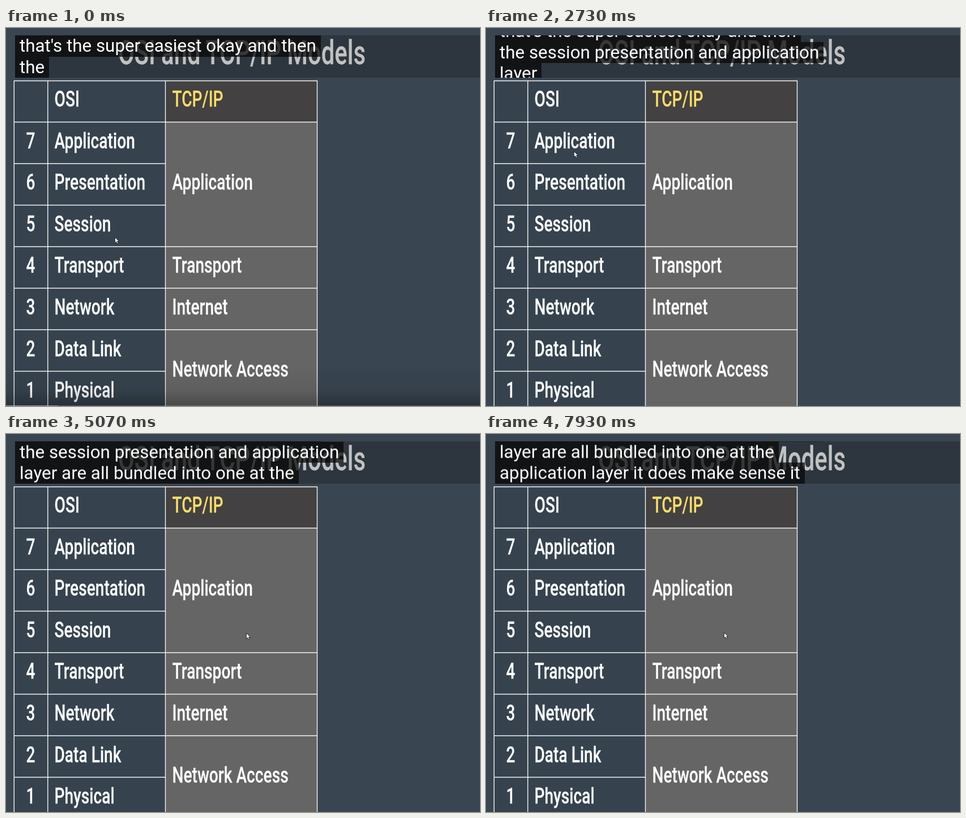
These frames come from a looping animation (837x669 px, 8000 ms). An HTML page:

```html
<!DOCTYPE html>
<html lang="en">
<head>
<meta charset="utf-8">
<title>Network layers</title>
<style>
  html, body { margin: 0; width: 100%; height: 100%; overflow: hidden; background: #394550; }
  #stage { position: relative; width: 837px; height: 669px; overflow: hidden; }
  #slide { position: absolute; left: 0; top: 0; }
  #slide text { font: 500 39.4px Roboto, sans-serif; fill: #fff; stroke: #fff; stroke-width: .25px; }
  #slide .title { font-size: 58.4px; }
  #slide .gold { fill: #fadc6c; stroke: #fadc6c; }
  .grid { fill: none; stroke: #f2f4f5; stroke-width: 1.4; }

  #cursor { position: absolute; left: 0; top: 0; overflow: visible; animation: wander 8s infinite linear; }
  @keyframes wander {
    0%, 6.63%       { transform: translate(192px, 370px); }
    13%             { transform: translate(188px, 354px); }
    18%             { transform: translate(182px, 300px); }
    23%, 25%        { transform: translate(175px, 275px); }
    31%, 36%        { transform: translate(155px, 218px); }
    42%             { transform: translate(300px, 288px); }
    48.2%, 49.2%    { transform: translate(553px, 345px); }
    50%             { transform: translate(516px, 349px); }
    54%, 64%        { transform: translate(424px, 352px); }
    71%, 100%       { transform: translate(420px, 351px); }
  }

  #controls {
    position: absolute; left: 0; right: 0; bottom: 0; height: 70px;
    background: linear-gradient(transparent, rgba(0,0,0,.06) 60%, rgba(0,0,0,.27));
    animation: hide 8s infinite linear;
  }
  #controls::after {
    content: ""; position: absolute; left: 0; right: 0; bottom: 0; height: 1px;
    background: linear-gradient(90deg, rgba(255,255,255,.55) 92px, rgba(255,255,255,.22) 92px);
  }
  @keyframes hide {
    0%, 6.63% { opacity: 1; }
    10%, 100% { opacity: 0; }
  }

  #captions {
    position: absolute; left: 16px; top: 13.4px; right: 0; height: 74.6px;
    overflow: hidden; background: rgba(8,8,8,.25);
  }
  #roll { animation: roll 8s infinite linear; }
  @keyframes roll {
    0%, 30.34%      { transform: translateY(0); }
    35.75%, 67.5%   { transform: translateY(-37.3px); }
    72.9%, 100%     { transform: translateY(-74.6px); }
  }
  .line { height: 37.3px; }
  .line span {
    display: inline-block; padding: 0 8px; background: rgba(8,8,8,.75); color: #fff;
    font: 31.35px/37.3px Roboto, sans-serif; white-space: pre;
  }
</style>
</head>
<body>
<div id="stage">
  <svg id="slide" width="837" height="669">
    <rect x="14" y="93.5" width="267.5" height="580" fill="#36434e"/>
    <rect x="281.5" y="93.5" width="268" height="73" fill="#434141"/>
    <rect x="281.5" y="166.5" width="268" height="510" fill="#656565"/>
    <path class="grid" d="M14.3 680V93.5H549.5V680M73.8 93.5V680M281.5 93.5V680
      M14 166.5H549.5M14 240H281.5M14 313.5H281.5M14 387H549.5M14 460.5H549.5M14 534H549.5M14 607.5H281.5"/>
  </svg>
  <svg id="cursor" width="10" height="14">
    <path d="M.4 .4V10.4L2.7 8.3L4.3 11.8L6 11L4.5 7.6H7.6Z" fill="#fff" stroke="#111" stroke-width=".8"/>
  </svg>
  <div id="controls"></div>
  <div id="captions"><div id="roll"></div></div>
</div>
<script>
  const LOOP = 8000, ROW = 73.6, BASE = 139;
  const slide = document.getElementById('slide');

  // One condensed face for every label on the slide
  function label(text, x, y, cls = '', anchor = 'start') {
    const el = document.createElementNS('http://www.w3.org/2000/svg', 'text');
    el.setAttribute('transform', `translate(${x} ${y}) scale(.714 1)`);
    el.setAttribute('text-anchor', anchor);
    el.setAttribute('class', cls);
    el.textContent = text;
    slide.append(el);
  }

  label('OSI and TCP/IP Models', 198, 63.5, 'title');
  label('OSI', 85.5, BASE);
  label('TCP/IP', 293.5, BASE, 'gold');
  ['Application', 'Presentation', 'Session', 'Transport', 'Network', 'Data Link', 'Physical']
    .forEach((name, i) => {
      const y = BASE + (i + 1) * ROW;
      label(7 - i, 43.5, y, '', 'middle');
      label(name, 85.5, y);
    });
  [['Application', 2], ['Transport', 4], ['Internet', 5], ['Network Access', 6.5]]
    .forEach(([name, row]) => label(name, 293.5, BASE + row * ROW));

  // Caption lines with the time at which each word appears
  const lines = [
    ["that's the super easiest okay and then", []],
    ['the session presentation and application', [0, 800, 1270, 1730, 2270]],
    ['layer are all bundled into one at the', [2427, 3200, 3400, 3730, 4130, 4400, 4730, 4930]],
    ['application layer it does make sense it', [5400, 5930, 6265, 6595, 7065, 7395, 7725]]
  ].map(([text, times]) => {
    const row = document.createElement('div');
    const span = document.createElement('span');
    row.className = 'line';
    row.append(span);
    document.getElementById('roll').append(row);
    return { words: text.split(' '), times, span };
  });

  const start = performance.now();
  function draw() {
    const t = Math.max(0, performance.now() - start) % LOOP;
    for (const { words, times, span } of lines) {
      const text = words.filter((_, i) => t >= (times[i] || 0)).join(' ');
      if (span.textContent !== text) span.textContent = text;
      span.style.visibility = text ? 'visible' : 'hidden';
    }
    requestAnimationFrame(draw);
  }
  draw();
</script>
</body>
</html>
```
